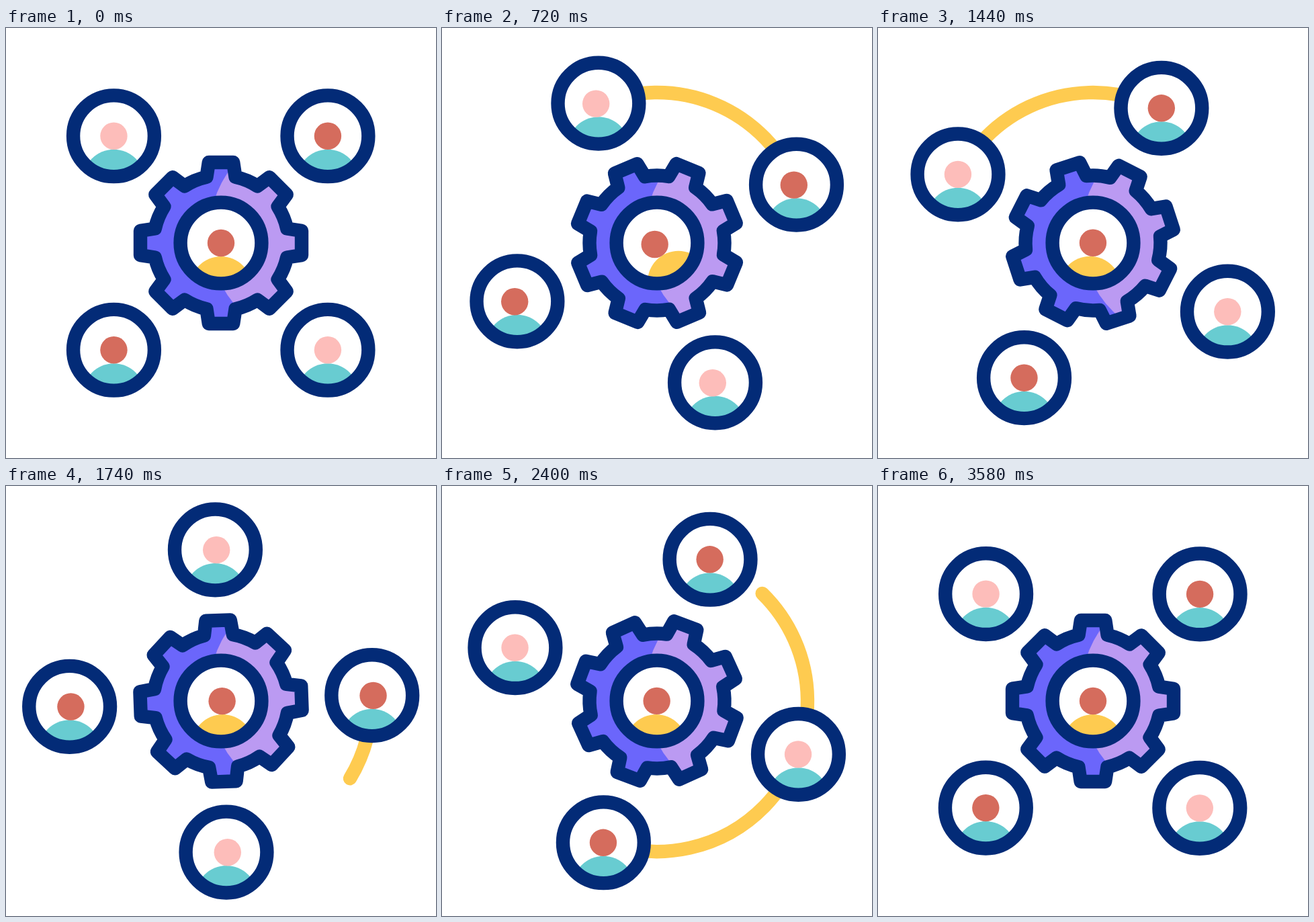
An HTML page with a canvas for the animation above (3600 ms loop, 640 px wide and 640 px high).

```html
<!DOCTYPE html>
<html lang="en">
<head>
<meta charset="utf-8">
<title>Team gear</title>
<style>
html, body { margin: 0; width: 100%; height: 100%; overflow: hidden; background: #fff; }
canvas { display: block; }
</style>
</head>
<body>
<canvas id="stage" width="640" height="640"></canvas>
<script>
const ctx = document.getElementById('stage').getContext('2d');
const LOOP = 3600, DEG = Math.PI / 180, ORBIT = 225.2;
const NAVY = '#032b77', YELLOW = '#fecb50', TEAL = '#68ccd1', RED = '#d56c5d',
  PINK = '#fdbdba', VIOLET = '#6b66fb', LILAC = '#bb9af2';

// [time, value] keys joined by a smooth curve that is level at every peak
const spin = [[0, 0], [270, -9], [720, 22.2], [1140, 99.8], [1740, 222.7],
  [2400, 335.5], [2910, 380.8], [3600, 360]];
const headShift = [[0, 0], [720, -3.7], [1140, -2.7], [1740, 1.8], [2400, -0.4], [3040, 0], [3600, 0]];
const bodySwing = [[0, 0], [720, -29], [1140, 10], [1740, -2.2], [2400, 1.1], [3040, 0], [3600, 0]];
const trailStart = [[400, 0], [720, 45], [1140, 135], [1740, 315], [1850, 360],
  [2400, 159], [3040, 45], [3300, 0]];
const trailEnd = [[250, 0], [720, 135], [1140, 283.6], [1740, 348], [1850, 360],
  [2400, 315], [3040, 111.5], [3450, 0]];

function slope(keys, i) {
  if (!keys[i - 1] || !keys[i + 1]) return 0;
  const rate = j => (keys[j + 1][1] - keys[j][1]) / (keys[j + 1][0] - keys[j][0]);
  const before = rate(i - 1), after = rate(i);
  return before * after > 0 ? (before + after) / 2 : 0;
}

function valueAt(keys, t) {
  const next = keys.findIndex(k => k[0] > t);
  if (next === 0) return keys[0][1];
  if (next < 0) return keys[keys.length - 1][1];
  const [t0, v0] = keys[next - 1], [t1, v1] = keys[next];
  const d = t1 - t0, u = (t - t0) / d, w = 1 - u;
  return v0 * w * w * (1 + 2 * u) + v1 * u * u * (1 + 2 * w)
    + d * u * w * (w * slope(keys, next - 1) - u * slope(keys, next));
}

function gearPath() {
  const path = new Path2D(), root = 100.5, baseAngle = Math.asin(21.5 / root);
  for (let i = 0; i < 8; i++) {
    const a = i * 45 * DEG, top = a - 90 * DEG;
    const corner = x => path.lineTo(
      x * Math.cos(a) + 120 * Math.sin(a), x * Math.sin(a) - 120 * Math.cos(a));
    corner(-18.2);
    corner(18.2);
    path.arc(0, 0, root, top + baseAngle, top + 45 * DEG - baseAngle);
  }
  path.closePath();
  return path;
}
const gear = gearPath();

function disc(x, y, r, color) {
  ctx.fillStyle = color;
  ctx.beginPath();
  ctx.arc(x, y, r, 0, 2 * Math.PI);
  ctx.fill();
}

function person(x, y, skin, shirt, headX, headY, swing) {
  ctx.save();
  ctx.translate(x, y);
  disc(0, 0, 60, '#fff');
  ctx.save();
  ctx.clip();
  disc(-66 * Math.sin(swing), 66 * Math.cos(swing), 46, shirt);
  ctx.restore();
  disc(headX, headY, 20.2, skin);
  ctx.strokeStyle = NAVY;
  ctx.lineWidth = 20.4;
  ctx.beginPath();
  ctx.arc(0, 0, 60.4, 0, 2 * Math.PI);
  ctx.stroke();
  ctx.restore();
}

function drawGear(angle) {
  ctx.save();
  ctx.rotate(angle);
  ctx.fillStyle = VIOLET;
  ctx.fill(gear);
  ctx.clip(gear);
  ctx.rotate(-angle);
  disc(145, -13.4, 163, LILAC);
  ctx.restore();

  ctx.save();
  ctx.rotate(angle);
  ctx.strokeStyle = NAVY;
  ctx.lineWidth = 20.4;
  ctx.lineJoin = 'round';
  ctx.stroke(gear);
  ctx.restore();
}

function drawTrail(t, angle) {
  const from = valueAt(trailStart, t), to = valueAt(trailEnd, t);
  if (to - from < 0.1) return;
  const origin = angle - Math.PI;
  ctx.strokeStyle = YELLOW;
  ctx.lineWidth = 20.4;
  ctx.lineCap = 'round';
  ctx.beginPath();
  ctx.arc(0, 0, 224, origin + from * DEG, origin + to * DEG);
  ctx.stroke();
}

function draw(t) {
  const angle = valueAt(spin, t) * DEG, shift = valueAt(headShift, t);
  const swing = valueAt(bodySwing, t);
  ctx.fillStyle = '#fff';
  ctx.fillRect(0, 0, 640, 640);
  ctx.save();
  ctx.translate(320, 320);
  drawTrail(t, angle);
  drawGear(angle);
  person(0, 0, RED, YELLOW, shift * 0.9, -swing * 0.07, swing * DEG);
  for (let i = 0; i < 4; i++) {
    const a = angle + (i * 90 - 135) * DEG;
    person(ORBIT * Math.cos(a) - 0.3, ORBIT * Math.sin(a), i % 2 ? RED : PINK, TEAL,
      shift, Math.abs(shift) * 0.12, 0);
  }
  ctx.restore();
}

function tick() {
  draw(performance.now() % LOOP);
  requestAnimationFrame(tick);
}
tick();
</script>
</body>
</html>
```
